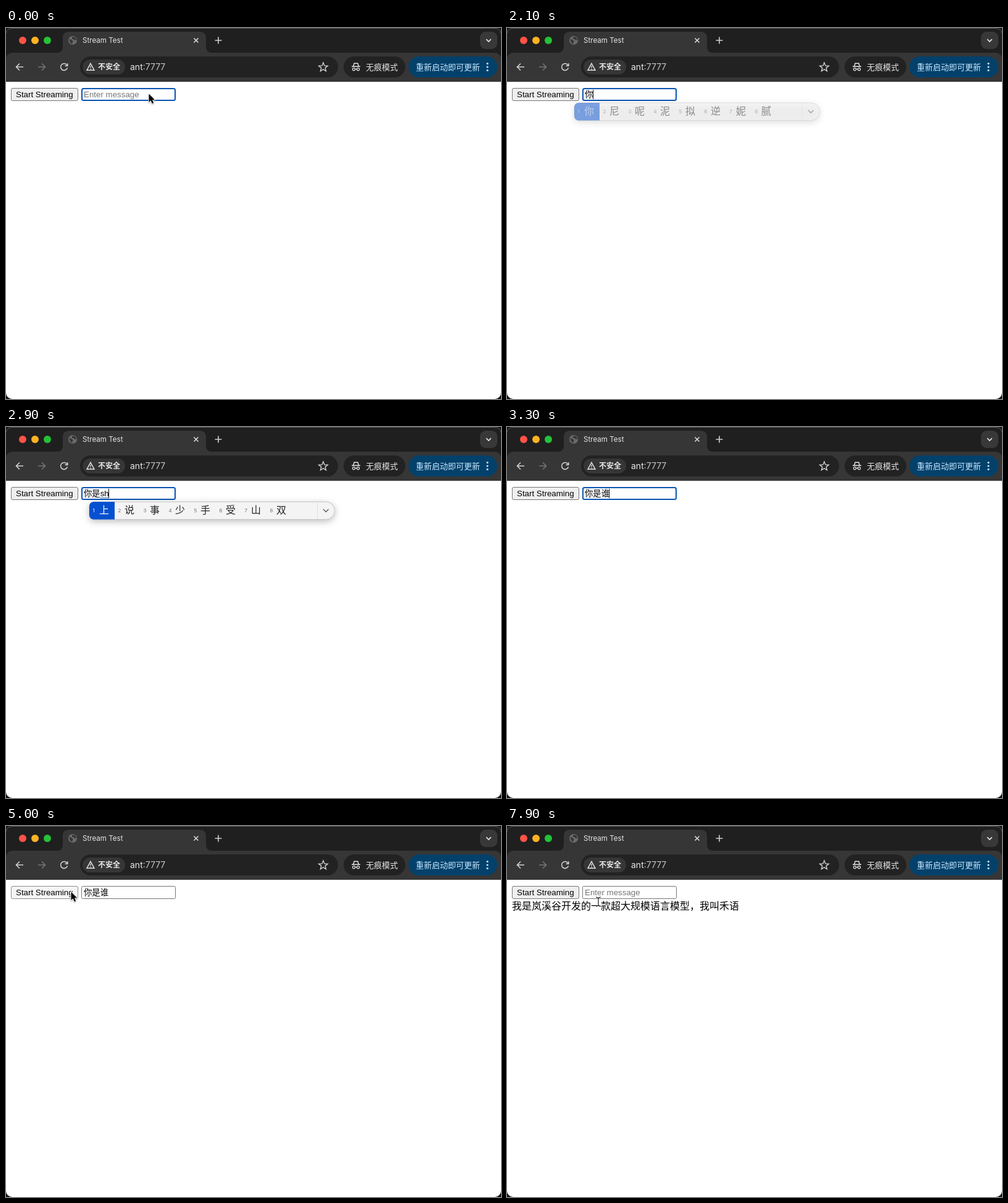
An HTML page with a canvas for the animation above (8 s loop, 802 px wide and 600 px high).

```html
<!DOCTYPE html>
<html lang="zh-CN">
<head>
<meta charset="utf-8">
<title>Stream Test</title>
<style>
html, body { margin: 0; width: 100%; height: 100%; overflow: hidden; background: #1f1f1f; }
canvas { display: block; width: 802px; height: 600px; }
</style>
</head>
<body>
<canvas id="stage"></canvas>
<script>
const W = 802, H = 600, LOOP = 8000, TICK = 100;
const UI = 'Inter, "Noto Sans CJK SC", sans-serif';
const FORM = '"Liberation Sans", Arial, "Noto Sans CJK SC", sans-serif';
const CJK = '"Noto Sans CJK SC", sans-serif';
const FIELD_FONT = '13.333px ' + FORM;

const canvas = document.getElementById('stage');
const ctx = canvas.getContext('2d');
const dpr = window.devicePixelRatio || 1;
canvas.width = W * dpr;
canvas.height = H * dpr;

// Timelines: [start ms, value...]; each entry holds until the next one.
// Field: committed text, composing text, candidate list, list opacity
const field = [
  [0, '', ''],
  [700, 'n', ''],
  [1000, 'ni', ''],
  [1200, 'n', ''],
  [1300, '', ''],
  [1700, '', 'n'],
  [1800, '', 'n', '你那能呢年哪内女', 1],
  [1900, '', 'ni', '你尼呢泥拟逆妮腻', 1],
  [2100, '你', '', '你尼呢泥拟逆妮腻', 0.5],
  [2200, '你', ''],
  [2400, '你', 's'],
  [2500, '你', 'shi', '是时事式使十#市', 1],
  [2600, '你是', ''],
  [2800, '你是', 's'],
  [2900, '你是', 'sh', '上说事少手受山双', 1],
  [3000, '你是', 'shu', '书数树输属熟术束', 1],
  [3100, '你是', 'shui', '谁水睡税说瑞帅蜕', 1],
  [3200, '你是谁', '', '谁水睡税说瑞帅蜕', 0.5],
  [3300, '你是谁', ''],
  [5100, '', '']
];
const caret = [[0, 0], [300, 1], [3700, 0], [4200, 1], [4700, 0]];
const reply = [
  [0, ''],
  [7700, '我是岚溪谷'],
  [7800, '我是岚溪谷开发的一款超大规模语言'],
  [7900, '我是岚溪谷开发的一款超大规模语言模型，我叫禾语']
];
const pointer = [
  [0, 231, 106], [4500, 231, 106], [4900, 106, 107],
  [5000, 105, 106], [5300, 147, 121], [LOOP, 147, 121]
];

const at = (list, t) => list.findLast(e => e[0] <= t);

function pointerAt(t) {
  const i = pointer.findIndex(p => p[0] > t);
  const [t0, x0, y0] = pointer[i - 1], [t1, x1, y1] = pointer[i];
  const u = (t - t0) / (t1 - t0), e = u * u * (3 - 2 * u);
  return [x0 + (x1 - x0) * e, y0 + (y1 - y0) * e];
}

function box(x, y, w, h, r, fill, stroke, lw = 1) {
  ctx.beginPath();
  ctx.roundRect(x, y, w, h, r);
  if (fill) { ctx.fillStyle = fill; ctx.fill(); }
  if (stroke) { ctx.strokeStyle = stroke; ctx.lineWidth = lw; ctx.stroke(); }
}

function dot(x, y, r, fill) {
  ctx.beginPath();
  ctx.arc(x, y, r, 0, Math.PI * 2);
  ctx.fillStyle = fill;
  ctx.fill();
}

function path(d, stroke, lw = 1.5, fill) {
  const p = new Path2D(d);
  if (fill) { ctx.fillStyle = fill; ctx.fill(p); }
  if (stroke) { ctx.strokeStyle = stroke; ctx.lineWidth = lw; ctx.stroke(p); }
}

function text(s, x, y, font, fill) {
  ctx.font = font;
  ctx.fillStyle = fill;
  ctx.fillText(s, x, y);
}

function drawTabs() {
  box(0, 0, W, H, 0, '#151515');
  box(0, 0, W, H, 10, '#1f1f1f');
  path('M0 9Q1 .5 10 .5H792Q801 .5 802 9', '#585858', 1);
  dot(27, 20, 6, '#ff5249');
  dot(47, 20, 6, '#fdb224');
  dot(67, 20, 6, '#25c138');

  box(0, 40, W, 47, [10, 10, 0, 0], '#363636');
  path('M82 40Q92 40 92 30V16Q92 6 102 6H314Q324 6 324 16V30Q324 40 334 40Z', null, 0, '#363636');

  dot(108, 20, 7, '#6a6b6d');
  path('M102.5 18Q106 18 107 20L109 21.5L107.5 23V26Q103 24 102.5 18Z'
    + 'M107 14.5L111 14.5Q113.5 16.5 114 19.5L111.5 20L109.5 18H107Z', null, 0, '#363636');
  text('Stream Test', 124, 24, '11.6px ' + UI, '#e6e6e6');
  path('M304.5 16.5L311.5 23.5M311.5 16.5L304.5 23.5', '#e0e0e0', 1.5);
  path('M338.5 20H349.5M344 14.5V25.5', '#d0d0d0', 1.6);
  box(768, 6, 28, 28, 9, '#383838');
  path('M778.2 18.2L782 22L785.8 18.2', '#e3e3e3', 1.7);
}

function drawToolbar() {
  const ink = '#d2d2d2';
  path('M28 63H17M22 57.5L16.5 63L22 68.5', ink, 1.6);
  path('M52 63H63M58 57.5L63.5 63L58 68.5', '#757575', 1.6);
  path('M98.7 60A5.5 5.5 0 1 0 99.4 64.5M99.7 57.2V61.2H95.5', ink, 1.6);

  box(120, 46, 418, 34, 17, '#222222');
  box(124, 51, 69, 24, 12, '#363636');
  path('M137 57.3L143 68.3H131Z', '#e3e3e3', 1.4);
  path('M137 61V64.6M137 65.6V67', '#e3e3e3', 1.3);
  text('不安全', 149, 67.4, 'bold 12px ' + CJK, '#e6e6e6');
  text('ant', 201, 68, '14px ' + UI, '#e8e8e8');
  const host = ctx.measureText('ant').width;
  text(':7777', 201 + host, 68, '14px ' + UI, '#c4c4c4');

  ctx.beginPath();
  for (let i = 0; i < 10; i++) {
    const a = -Math.PI / 2 + i * Math.PI / 5, r = i % 2 ? 3.3 : 7.6;
    ctx.lineTo(514 + r * Math.cos(a), 63.6 + r * Math.sin(a));
  }
  ctx.closePath();
  ctx.strokeStyle = ink;
  ctx.lineWidth = 1.4;
  ctx.stroke();

  box(547, 46, 100, 34, 17, '#222222');
  path('M560 62.3H574M562.8 62L564 57.3H570L571.2 62', '#e3e3e3', 1.4);
  path('M565.6 66.8A2.1 2.1 0 1 1 561.4 66.8A2.1 2.1 0 1 1 565.6 66.8'
    + 'Q567 65.8 568.4 66.8A2.1 2.1 0 1 1 572.6 66.8A2.1 2.1 0 1 1 568.4 66.8', '#e3e3e3', 1.3);
  text('无痕模式', 583, 68, '13px ' + CJK, '#e6e6e6');

  box(652, 46, 144, 34, 17, '#03416b');
  text('重新启动即可更新', 664, 68, '13px ' + CJK, '#c6e7ff');
  for (const y of [57.5, 63, 68.5]) dot(780, y, 1.6, '#c6e7ff');
}

function drawCandidates(x, list, alpha) {
  const y = 121, w = 397.5, h = 28.5, r = [7, 14, 14, 7];
  ctx.save();
  ctx.globalAlpha = alpha;
  ctx.save();
  ctx.shadowColor = 'rgba(0,0,0,.28)';
  ctx.shadowBlur = 12 * dpr;
  ctx.shadowOffsetY = 3 * dpr;
  box(x, y, w, h, r, '#f4f4f4');
  ctx.restore();
  box(x, y, w, h, r, '#f4f4f4', '#c4c4c4', 1);
  box(x, y, 41, h, [7, 0, 0, 7], '#0650d0');
  let left = x;
  [...list].forEach((ch, i) => {
    text(i + 1, left + 5.5, 138, '8px ' + UI, i ? '#707070' : '#ffffff');
    if (ch === '#') {
      const g = ctx.createLinearGradient(0, 124, 0, 144);
      g.addColorStop(0, '#7595ad');
      g.addColorStop(1, '#3d627e');
      box(left + 17.5, 124.5, 19, 19, 4, g, '#45596a');
      text('10', left + 19.3, 139, 'bold 13px ' + UI, '#ffffff');
      left += 45;
    } else {
      text(ch, left + 16, 140.3, '16px ' + CJK, i ? '#262626' : '#ffffff');
      left += 41;
    }
  });
  box(x + 369, y + 1, 1, h - 2, 0, '#dfdfdf');
  path(`M${x + 379} 133L${x + 383.3} 137.3L${x + 387.6} 133`, '#5c5c5c', 1.4);
  ctx.restore();
}

function drawForm(t) {
  const pressed = t >= 4900 && t < 5100, focused = t < 4900;
  box(8.5, 97.5, 108, 20, 2.5, pressed ? '#f5f5f5' : '#efefef', pressed ? '#8d8d8d' : '#767676');
  text('Start Streaming', 16, 112, FIELD_FONT, '#000');

  if (focused) box(123, 98, 151, 19, 2.5, '#fff', '#0a55b2', 2);
  else box(122.5, 97.5, 152, 20, 2, '#fff', '#767676');

  const [, done, typing, list, alpha] = at(field, t);
  const value = done + typing;
  text(value || 'Enter message', 126, 112, FIELD_FONT, value ? '#000' : '#757575');
  const start = 126 + ctx.measureText(done).width;
  const end = value ? 126 + ctx.measureText(value).width : 126;
  if (typing) box(start, 114, end - start, 1, 0, '#3b6fb5');
  if (at(caret, t)[1]) box(Math.floor(end - 0.3), 100, 1, 15, 0, '#000');
  if (list) {
    const anchor = typing ? start : end - 13.333;
    drawCandidates(Math.round(anchor - 17.2), list, alpha);
  }
}

function drawPointer(t) {
  if (t >= 700 && t < 4500) return;
  const [x, y] = pointerAt(t);
  ctx.save();
  ctx.translate(x, y);
  ctx.lineJoin = 'round';
  if (t >= 7800) {
    const beam = 'M-3 -6Q0 -6 1 -4Q2 -6 5 -6M1 -4V7M-3 9Q0 9 1 7Q2 9 5 9';
    path(beam, '#fff', 2.6);
    path(beam, '#000', 1.1);
  } else {
    const arrow = 'M.5 .5V14L3.6 11.2L5.8 16.2L8.2 15.2L6 10.3H10.2Z';
    ctx.save();
    ctx.shadowColor = 'rgba(0,0,0,.35)';
    ctx.shadowBlur = 2 * dpr;
    ctx.shadowOffsetY = dpr;
    path(arrow, '#fff', 2);
    ctx.restore();
    path(arrow, null, 0, '#000');
  }
  ctx.restore();
}

function draw(t) {
  ctx.setTransform(dpr, 0, 0, dpr, 0, 0);
  drawTabs();
  drawToolbar();
  box(0, 87, W, 513, [0, 0, 10, 10], '#fff');
  drawForm(t);
  text(at(reply, t)[1], 8, 135.3, '16px ' + CJK, '#000');
  drawPointer(t);
}

const begin = performance.now();
function frame() {
  const t = (performance.now() - begin) % LOOP;
  draw(Math.floor(t / TICK) * TICK);
  requestAnimationFrame(frame);
}
frame();
</script>
</body>
</html>
```
